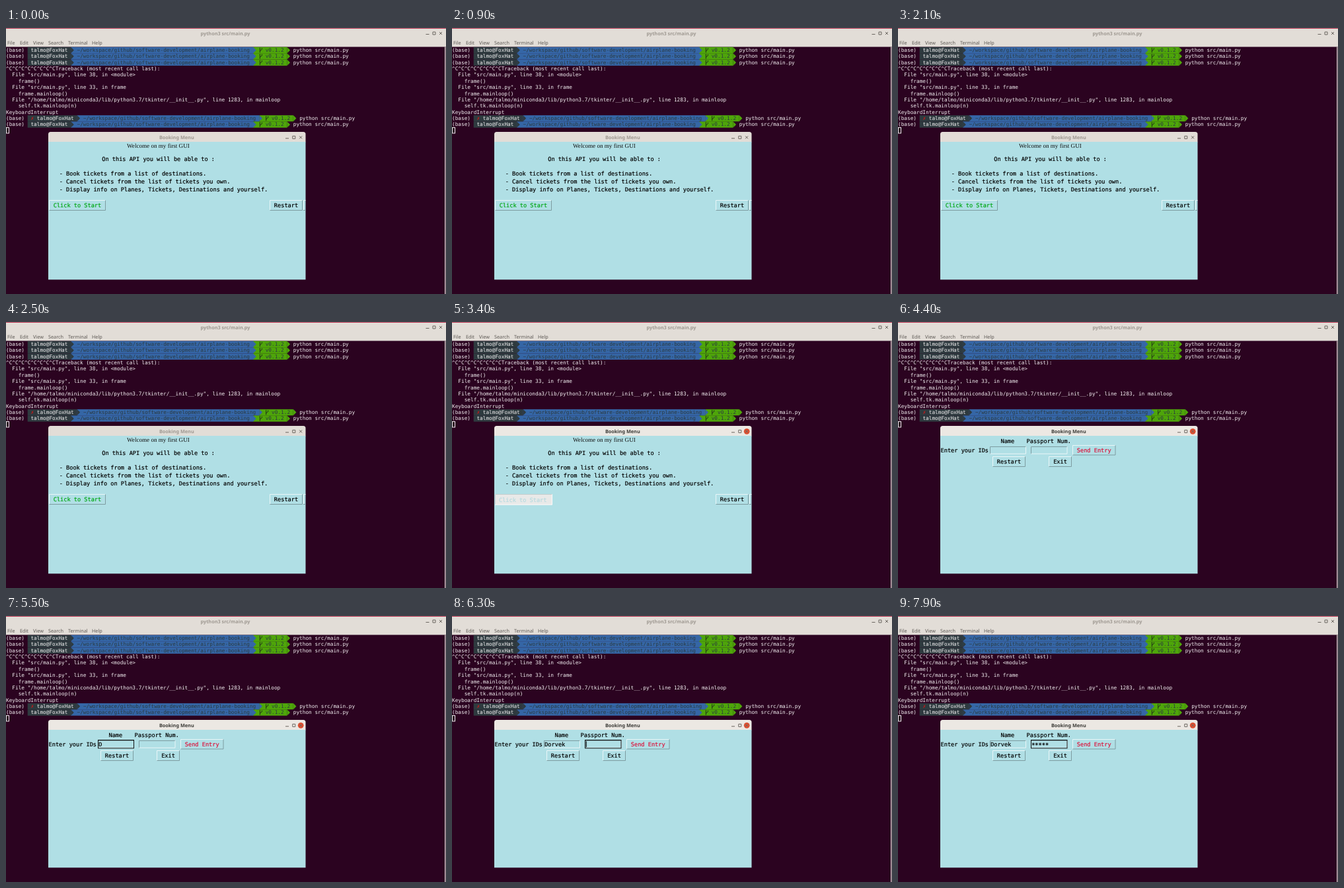
An HTML page that plays this animation: 666x402 px, repeating every 8 s.

```html
<!DOCTYPE html>
<html lang="en">
<head>
<meta charset="utf-8">
<title>Booking Menu</title>
<style>
  html, body { margin: 0; width: 100%; height: 100%; overflow: hidden; background: #2b0320; }
  svg { display: block; width: 666px; height: 402px; }
  text { white-space: pre; text-rendering: geometricPrecision; }
  .term { font: 7.766px "DejaVu Sans Mono", monospace; fill: #f4f1f2; }
  .dark { fill: #2b3a40; }
  .ui { font: 7.25px "Noto Sans", sans-serif; fill: #5f5b56; }
  .title { font: bold 7.3px "Noto Sans", sans-serif; fill: #9f9992; }
  .focused .title { fill: #3c3b37; }
  .tk { font: 8.6px "DejaVu Sans Mono", monospace; fill: #000; stroke: #000; stroke-width: .2px; }
  .welcome { font: 9.1px "Liberation Serif", serif; fill: #111; }
  .go { fill: #00a814; stroke: #00a814; }
  .send { fill: #dc143c; stroke: #dc143c; }
  .faint { fill: #b5dbe0; stroke: #b5dbe0; }
  .icon { fill: none; stroke: #6b6660; stroke-width: 1; }
</style>
</head>
<body>
<svg id="stage" viewBox="0 0 666 402"></svg>
<script>
const LOOP = 8000;
const CELL = 4.675, ROW = 9.37, TOP = 28.8;   // terminal grid
const TK = 5.18;                              // advance of the form font
const SKY = "#b0dfe5", LIGHT = "#e9f6f8", SHADE = "#7d9ca1";
const stage = document.getElementById("stage");

function add(parent, tag, attrs, content) {
  const node = document.createElementNS("http://www.w3.org/2000/svg", tag);
  for (const key in attrs) node.setAttribute(key, attrs[key]);
  if (content !== undefined) node.textContent = content;
  return parent.appendChild(node);
}
const group = (parent, attrs = {}) => add(parent, "g", attrs);
const rect = (p, x, y, width, height, fill) => add(p, "rect", { x, y, width, height, fill });
const path = (p, d, attrs) => add(p, "path", { d, ...attrs });
const label = (p, x, y, cls, s, extra = {}) => add(p, "text", { x, y, class: cls, ...extra }, s);
const show = (node, on) => node.setAttribute("visibility", on ? "visible" : "hidden");

// Two-tone edge: first colour on top and left, second on bottom and right.
function bevel(p, x, y, w, h, first, second) {
  const [l, t, r, b] = [x + .5, y + .5, x + w - .5, y + h - .5];
  path(p, `M${l} ${b}V${t}H${r}`, { fill: "none", stroke: first });
  path(p, `M${l} ${b}H${r}V${t}`, { fill: "none", stroke: second });
}
function button(p, x, y, w, h, s, cls = "") {
  bevel(p, x, y, w, h, LIGHT, SHADE);
  label(p, x + (w - s.length * TK) / 2, y + h / 2 + 3, "tk " + cls, s);
}

function controls(p, x, y, step, closeAttrs = {}) {
  path(p, `M${x - 2.5} ${y + 1.5}h5`, { class: "icon" });
  path(p, `M${x + step - 2} ${y - 2}h4v4h-4z`, { class: "icon" });
  path(p, `M${x + 2 * step - 2} ${y - 2}l4 4m0 -4l-4 4`, { class: "icon", ...closeAttrs });
}

// --- terminal ---
function arrow(p, col, y, color) {
  const x = col * CELL;
  path(p, `M${x} ${y}l${CELL} ${ROW / 2}l${-CELL} ${ROW / 2}z`, { fill: color });
}
function prompt(p, row, failed) {
  const y = TOP + row * ROW, base = y + 7.2, shift = failed ? 2 : 0;
  const gray = "#2e3a3f", blue = "#3566a6", green = "#4ea50a";
  const at = col => (col + shift) * CELL;
  rect(p, 7 * CELL, y, at(21) - 7 * CELL, ROW, gray);
  rect(p, at(21), y, 59 * CELL, ROW, blue);
  rect(p, at(80), y, 11 * CELL, ROW, green);
  arrow(p, 21 + shift, y, gray);
  arrow(p, 80 + shift, y, blue);
  arrow(p, 91 + shift, y, green);
  label(p, 0, base, "term", "(base)");
  if (failed) label(p, 8 * CELL, base, "term", "✗", { style: "fill:#d01818" });
  label(p, at(8), base, "term", "talmo@FoxHat");
  label(p, at(23), base, "term dark", "~/workspace/github/software-development/airplane-booking");
  const bx = at(82) + 1;
  path(p, `M${bx} ${y + 1}v7.4M${bx + 3} ${y + 1.5}v2l-3 2.5`, { fill: "none", stroke: "#20301c", "stroke-width": 1 });
  label(p, at(84), base, "term dark", "v0.1.2");
  label(p, at(93), base, "term", "python src/main.py");
}

rect(stage, 0, 0, 666, 402, "#2b0320");
rect(stage, 0, 0, 666, 28.5, "#e2ddd7");
rect(stage, 0, 0, 666, 1, "#b8324f");
rect(stage, 664, 28.5, 1.5, 373.5, "#cbc3c2");
label(stage, 332, 10.5, "title", "python3 src/main.py", { "text-anchor": "middle" });
controls(stage, 638, 8, 10);
[["File", 2], ["Edit", 21], ["View", 41], ["Search", 64], ["Terminal", 94], ["Help", 130]]
  .forEach(([s, x]) => label(stage, x, 24.8, "ui", s));

[0, 1, 2, 12].forEach(row => prompt(stage, row));
prompt(stage, 11, true);
[
  "^C^C^C^C^C^C^C^CTraceback (most recent call last):",
  '  File "src/main.py", line 38, in <module>',
  "    frame()",
  '  File "src/main.py", line 33, in frame',
  "    frame.mainloop()",
  '  File "/home/talmo/miniconda3/lib/python3.7/tkinter/__init__.py", line 1283, in mainloop',
  "    self.tk.mainloop(n)",
  "KeyboardInterrupt"
].forEach((s, i) => label(stage, 0, TOP + (i + 3) * ROW + 7.2, "term", s));
add(stage, "rect", { x: .5, y: 150.5, width: 4, height: 8.5, fill: "none", stroke: "#eee" });

// --- booking window ---
const win = group(stage);
const bar = path(win, "M64 172.5v-12q0 -3.5 3.5 -3.5h382.5q3.5 0 3.5 3.5v12z", {});
rect(win, 64, 172, 389.5, 208.3, SKY);
label(win, 258.3, 167.8, "title", "Booking Menu", { "text-anchor": "middle" });
const closeDot = add(win, "circle", { cx: 446.2, cy: 165.3, r: 4.4, fill: "#df4f30" });
controls(win, 425.5, 165.3, 10.3);

const intro = group(win);
label(intro, 183, 181.3, "welcome", "Welcome on my first GUI");
label(intro, 145.3, 201.3, "tk", "On this API you will be able to :");
[
  "- Book tickets from a list of destinations.",
  "- Cancel tickets from the list of tickets you own.",
  "- Display info on Planes, Tickets, Destinations and yourself."
].forEach((s, i) => label(intro, 80.7, 223.2 + 12 * i, "tk", s));
button(intro, 399, 260, 50, 16, "Restart");
path(intro, "M453.5 260.5H450.5V276", { fill: "none", stroke: LIGHT });
path(intro, "M450 275.5h3.5", { fill: "none", stroke: SHADE });

const startIdle = group(intro);
button(startIdle, 65, 260, 86, 16, "Click to Start", "go");
const startHover = group(intro);
rect(startHover, 65, 260, 87, 16.5, "#e9e9e8");
const startEdge = group(startHover);
bevel(startEdge, 65, 260, 87, 16.5, "#c3cccd", "#fafafa");
const startText = label(startHover, 71, 271, "tk faint", "Click to Start");

const form = group(win);
label(form, 155.5, 183.2, "tk", "Name");
label(form, 194.6, 183.2, "tk", "Passport Num.");
label(form, 64.6, 197.3, "tk", "Enter your IDs");
button(form, 264, 186, 65.5, 15.5, "Send Entry", "send");
button(form, 143, 203, 50, 16, "Restart");
button(form, 228, 203, 35, 16, "Exit");

function entry(x, width, baseline) {
  bevel(form, x, 188, width, 11.7, SHADE, LIGHT);
  const ring = add(form, "rect", { x: x + .5, y: 187.5, width: width - 1, height: 12.3, fill: "none", stroke: "#111" });
  const text = label(form, x + 1.2, baseline, "tk", "");
  const caret = rect(form, 0, 189.2, 1.1, 9.2, "#000");
  return (value, focused, caretOn) => {
    if (text.textContent !== value) text.textContent = value;
    caret.setAttribute("x", x + 1.7 + value.length * TK);
    show(ring, focused);
    show(caret, focused && caretOn);
  };
}
const nameEntry = entry(139, 55, 197.2);
const passEntry = entry(201, 55.5, 198.4);

// --- timeline ---
const blink = (t, start) => (t - start) % 900 < 600;
const typed = (s, t, start) => s.slice(0, Math.max(0, Math.floor((t - start) / 100) + 1));

function draw(now) {
  const t = now % LOOP;
  const focused = t >= 3200, onForm = t >= 3500;
  const hover = (t >= 2300 && t < 2500) || t >= 2800;

  win.setAttribute("class", focused ? "focused" : "");
  bar.setAttribute("fill", focused ? "#ece8e3" : "#e2ddd7");
  show(closeDot, focused);
  intro.style.display = onForm ? "none" : "";
  form.style.display = onForm ? "" : "none";
  startIdle.style.display = hover ? "none" : "";
  startHover.style.display = hover ? "" : "none";
  show(startEdge, focused);
  startText.setAttribute("y", focused ? 272 : 271);

  nameEntry(typed("Dorvek", t, 5500), t >= 4700 && t < 6300, blink(t, 4700));
  passEntry(typed("*****", t, 7100), t >= 6300, blink(t, 6300));
  requestAnimationFrame(() => draw(performance.now() - origin));
}
const origin = performance.now();
draw(0);
</script>
</body>
</html>
```
